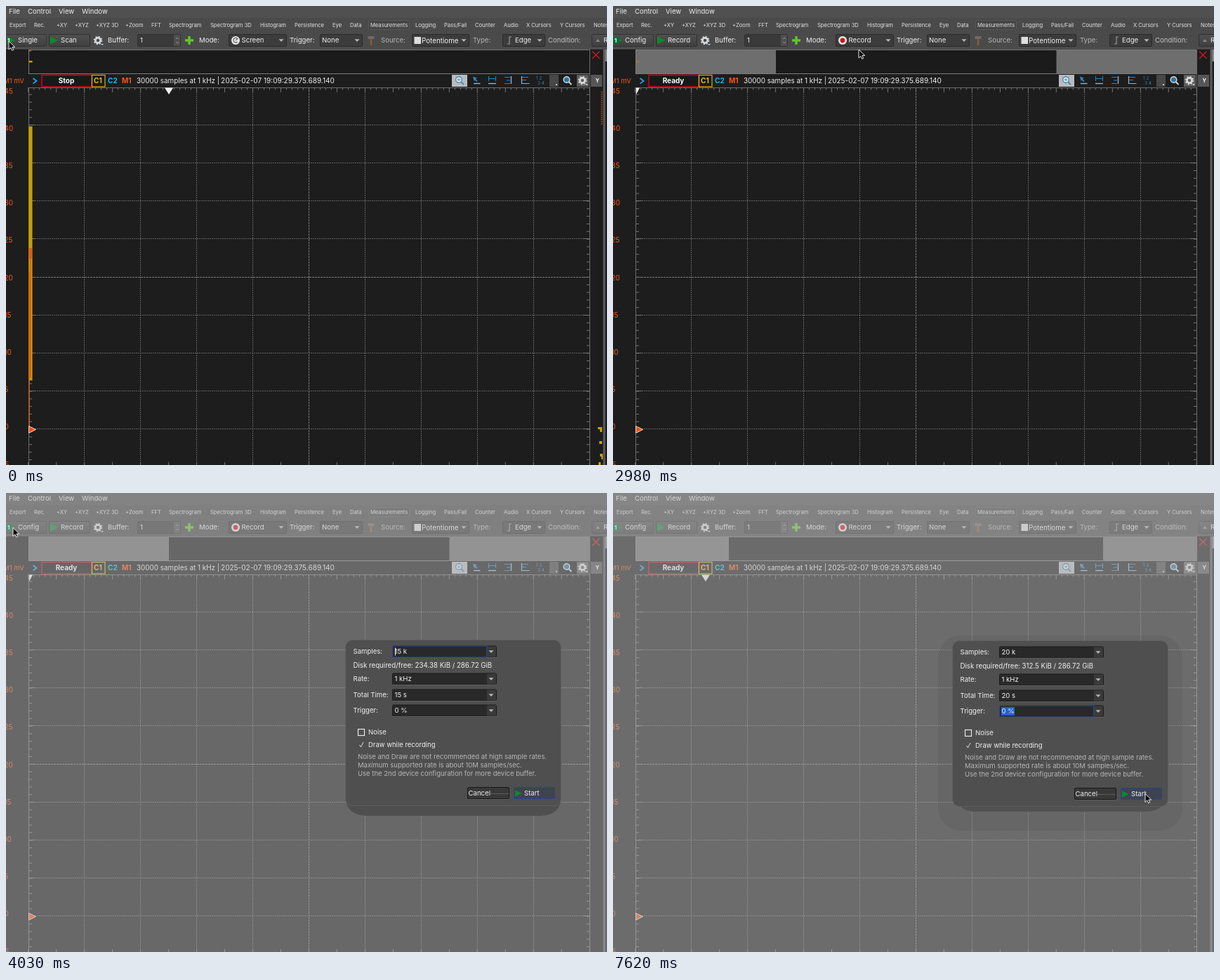
These frames come from a looping animation (856x654 px, 8 s). An HTML page:

```html
<!DOCTYPE html>
<html lang="en">
<head>
<meta charset="utf-8">
<title>Recorder setup</title>
<style>
html, body { margin: 0; width: 100%; height: 100%; overflow: hidden; background: #1d1d1d; }
svg { display: block; width: 856px; height: 654px; font-family: Inter, "Open Sans", sans-serif; }
text { white-space: pre; }
</style>
</head>
<body>
<svg id="stage" viewBox="0 0 856 654" xmlns="http://www.w3.org/2000/svg"></svg>
<script>
const LOOP = 8000;
const stage = document.getElementById('stage');
const el = id => document.getElementById(id);

// ---- drawing helpers: each returns markup ----
const rect = (x, y, w, h, fill, more = '') =>
  `<rect x="${x}" y="${y}" width="${w}" height="${h}" fill="${fill}" ${more}/>`;
const path = (d, fill, more = '') => `<path d="${d}" fill="${fill}" ${more}/>`;
const line = (d, color, more = '') => path(d, 'none', `stroke="${color}" ${more}`);
const text = (x, cy, s, size = 9.6, fill = '#f0f0f0', more = '') =>
  `<text x="${x}" y="${(cy + size * 0.36).toFixed(2)}" font-size="${size}" fill="${fill}" ${more}>${s}</text>`;
const bold = 'font-weight="700"';
const play = (x, cy, s = 5.5) => path(`M${x} ${cy - s}L${x + s * 2} ${cy}L${x} ${cy + s}Z`, '#0c8a2c');
const caret = (x, y) => path(`M${x - 3.5} ${y - 1.8}h7l-3.5 3.8z`, '#b4b4b4');
const box = (x, y, w, h, fill = 'url(#btn)', edge = '#303030', more = '') =>
  rect(x + 0.5, y + 0.5, w - 1, h - 1, fill, `stroke="${edge}" rx="1.5" ${more}`);
const combo = (x, w) => box(x, 40, w, 18, '#3c3c3c', '#2a2a2a') + caret(x + w - 8, 49);

function gear(x, y, color) {
  return `<circle cx="${x}" cy="${y}" r="3.6" fill="none" stroke="${color}" stroke-width="2.6"/>` +
    `<circle cx="${x}" cy="${y}" r="5.4" fill="none" stroke="${color}" stroke-width="1.8" stroke-dasharray="2.1 2.14"/>` +
    path(`M${x + 4} ${y + 5}h4l-2 2z`, color);
}

function lens(x, y, ring, fill) {
  return `<circle cx="${x}" cy="${y}" r="4.3" fill="${fill}" stroke="${ring}" stroke-width="1.4"/>` +
    line(`M${x + 3} ${y + 3}l4 4`, ring, 'stroke-width="1.8"');
}

function menus() {
  const top = [[4, 'File'], [31, 'Control'], [75, 'View'], [108, 'Window']];
  const tools = [[5, 'Export'], [40, 'Rec.'], [72, '+XY'], [98, '+XYZ'], [128, '+XYZ 3D'], [170, '+Zoom'],
    [207, 'FFT'], [232, 'Spectrogram'], [291, 'Spectrogram 3D'], [362, 'Histogram'], [411, 'Persistence'],
    [465, 'Eye'], [490, 'Data'], [519, 'Measurements'], [583, 'Logging'], [624, 'Pass/Fail'],
    [668, 'Counter'], [709, 'Audio'], [741, 'X Cursors'], [789, 'Y Cursors'], [837, 'Notes']];
  return rect(0, 0, 856, 61, '#4a4a4a') + rect(0, 0, 856, 17, '#505050') +
    rect(0, 60.5, 856, 1, '#626262') +
    box(516, 20, 59, 14, '#454545', '#585858') +
    top.map(([x, s]) => text(x, 8, s)).join('') +
    tools.map(([x, s]) => text(x, 27, s, 7.6, '#e4e4e4')).join('');
}

function controls() {
  return box(-3, 40, 61, 18, 'url(#btn)', '#343434', 'id="single"') +
    play(2, 49) + rect(0, 44, 9, 10, '#0b6b36', 'id="oneBack"') + text(2, 49, '1', 8, '#fff', bold) +
    text(17, 49, 'Single', 9.6, '#f0f0f0', 'id="singleText"') +
    box(61, 40, 59, 18) + `<g id="go">${play(63, 49)}</g>` +
    rect(63.5, 44, 11, 11, '#136797', 'id="halt" stroke="#0b4a75"') +
    text(78, 49, 'Scan', 9.6, '#f0f0f0', 'id="scanText"') +
    gear(131, 49, '#d6dade') + text(145, 49, 'Buffer:') +
    box(187, 40, 62, 18, '#3a3a3a') + text(191, 49, '1') + rect(239, 41, 9, 16, '#505050') +
    line('M242 47l2-2 2 2M242 51l2 2 2-2', '#8c8c8c') +
    line('M261 43v12M255 49h12', '#62c52a', 'stroke-width="3.4"') +
    text(275, 49, 'Mode:') + combo(317, 83) +
    '<circle cx="327" cy="49" r="6" fill="#ececec"/>' +
    `<g id="screenIcon">${line('M330 47a3.3 3.3 0 1 0-.4 4M327 49l3-2.4', '#555', 'stroke-width="1.2"')}</g>` +
    '<circle id="recIcon" cx="327" cy="49" r="3.4" fill="#d3131b"/>' +
    text(335.5, 49, 'Screen', 9.6, '#f0f0f0', 'id="modeText"') +
    text(404, 49, 'Trigger:') + combo(447, 61) + text(450, 49, 'None') +
    line('M520 46v10', '#8a5c2c', 'stroke-width="2.6"') + rect(515.5, 43, 9, 4, '#6b6b6b') +
    text(534, 49, 'Source:', 9.6, '#b4b4b4') + combo(578, 82) + rect(581.5, 44, 9.5, 10, '#dedede') +
    text(592, 49, 'Potentiome', 9.8) +
    text(665, 49, 'Type:', 9.6, '#b4b4b4') + combo(707, 61) +
    line('M714 54h3v-10h3', '#999', 'stroke-width="1.2"') + text(725, 49, 'Edge') +
    text(772, 49, 'Condition:', 9.6, '#c0c0c0') + box(834, 40, 30, 18) +
    path('M840 51l3-4 3 4z', '#888') + text(851, 49, 'R');
}

function overview() {
  return rect(32.5, 62.5, 799, 34, '#6e6e6e', 'stroke="#7c7c7c"') +
    rect(33, 63, 798, 33, '#1b1b1b', 'id="win"') +
    rect(33, 78, 4.5, 2.5, '#c79f00', 'id="ovMark"') + rect(33, 62.5, 3, 2, '#c45a20', 'class="data"') +
    line('M835 64.5l10.5 10.5M845.5 64.5l-10.5 10.5', '#d01822', 'stroke-width="1.4"');
}

function status() {
  const blue = '#2583cc', pale = '#8fb4d0';
  return line('M38.5 103l5 3.8-5 3.8', '#2a9cf0', 'stroke-width="1.8"') +
    rect(51, 98.5, 71, 16.5, '#191919', 'id="stateBox" stroke-width="1.6"') +
    text(86, 106.7, 'Stop', 10, '#fff', `id="stateText" text-anchor="middle" ${bold}`) +
    rect(122.5, 98.5, 18.5, 16.5, '#191919', 'stroke="#d9b01c" stroke-width="1.2"') +
    text(125, 106.7, 'C1', 10, '#e8bc1c', bold) + text(145, 106.7, 'C2', 10, '#1cb5ee', bold) +
    text(165, 106.7, 'M1', 10, '#f35a17', bold) +
    text(186, 106.7, '30000 samples at 1 kHz', 9.9) + text(301, 106.7, '|', 9.9) +
    text(306, 106.7, '2025-02-07 19:09:29.375.689.140', 10.05) +
    rect(635, 98, 22, 17, '#b8bcbf') + lens(645, 105, '#4a86ad', '#e4ecf1') + line('M643 105h4M645 103v4', '#3585b8') +
    path('M665 100.5l6 2-2 1.4 2.6 2.6-1.5 1.5-2.6-2.6-1 1.6z', blue) + line('M666 110.5h9.5', pale, 'stroke-width="1.4"') +
    line('M687.5 100v7M697.5 100v7M688 103.5h9', blue) + line('M687 110.5h11', pale, 'stroke-width="1.4"') +
    line('M710 101.5h8M710 110.5h8M713 106h5', blue) + line('M719.5 100v11', pale, 'stroke-width="1.4"') +
    line('M735 101.5h9M735 105.5h6', blue) + line('M734.5 100v10.5h11', pale, 'stroke-width="1.2"') +
    text(755, 103, '1 2', 6.5, blue) + text(757, 110, '3 4', 6.5, blue) +
    rect(774, 98, 13, 17, '#484848') + rect(783, 111, 2, 2, '#bbb') +
    lens(798.5, 105, '#d8dde0', '#2d76a4') +
    rect(813, 98, 17, 17, '#5e5e5e') + gear(821, 106, '#dadada') +
    rect(833, 98, 16, 17, '#565656') + text(839.5, 106.7, 'Y', 7.5, '#fff', bold);
}

function grid() {
  let s = '', ticks = '';
  const rule = (d, mid) => line(d, mid ? '#787878' : '#606060', `stroke-dasharray="${mid ? '3 1' : '2 1'}"`);
  for (let i = 1; i < 10; i++) s += rule(`M${Math.floor(31.7 + i * 79.95) + 0.5} 116V654`, i === 5);
  for (let i = 0; i < 9; i++) {
    const y = Math.floor(169.2 + i * 54.2) + 0.5;
    s += rule(`M32 ${y}H831`, i === 4);
    ticks += `M32 ${y}h9M831 ${y}h-9`;
  }
  for (let i = 0; i <= 100; i++) {
    const x = (31.7 + i * 7.995).toFixed(1);
    ticks += `M${x} 116v${i % 5 ? 3.5 : 7}`;
    if (i % 5 === 0) ticks += `M${x} 654v-4`;
  }
  for (let y = 126.2; y < 654; y += 10.84) ticks += `M32 ${y.toFixed(1)}h5M831 ${y.toFixed(1)}h-4`;
  s += line(ticks, '#747474') + line('M32.5 116V654M831.5 62V654M32 116.5H831', '#6c6c6c');
  for (let i = 0; i <= 10; i++) s += text(i === 10 ? -6 : -2.5, 121 + i * 53.2, 45 - i * 5, 10, '#f35a17');
  return s + text(-4, 106.7, 'M1 mV', 9.6, '#f35a17');
}

function signal() {
  return '<g class="data">' + rect(32.5, 171.5, 5, 362, '#c9a000') +
    rect(33, 345, 4, 15, '#e9570c') + rect(33.8, 360, 1.8, 170, '#e9570c') + rect(32.8, 380, 1, 222, '#e9570c') +
    line('M848.5 122V170', '#b5501c', 'stroke-width="2" stroke-dasharray="1.5 1.5"') +
    path('M843 600h6v7h-3v-4h-3zM845 620h4v4h-4zM846 638h4v8h-2v-4h-2zM844 650h3v4h-3z', '#c9a000') + '</g>' +
    path('M32.5 598.5L42.5 603.5L32.5 608.5Z', '#f2510e', 'stroke="#eee" stroke-width=".9"');
}

function field(cy, name, label, value) {
  return text(494.5, cy, label) + box(550, cy - 8.5, 149, 17, '#292929', '#1b1b1b') +
    line(`M551 ${cy + 8.5}H699`, '#707070', 'stroke-width=".7"') +
    rect(685, cy - 7.5, 13, 15, '#3a3a3a') + caret(691, cy) +
    rect(550.7, cy - 8, 134, 16, 'none', `id="${name}Focus" stroke="#2a4a8c" stroke-width="1.2"`) +
    rect(553, cy - 6, 19, 12, '#2c60cc', `id="${name}Sel"`) +
    text(553.5, cy, value, 9.6, '#f4f4f4', `id="${name}"`);
}

function dialog() {
  const hints = ['Noise and Draw are not recommended at high sample rates.',
    'Maximum supported rate is about 10M samples/sec.',
    'Use the 2nd device configuration for more device buffer.'];
  return `<g id="dialog">
    ${rect(463, 203, 348, 278, '#000', 'id="halo" rx="32" opacity=".06"')}
    ${path('M495 446q5 8 24 8H756q20 0 25-8z', '#525252', 'id="lip"')}
    ${path('M484 440q4 21 32 21H759q28 0 31-21z', '#4f4f4f', 'id="drop"')}
    ${rect(483.5, 210.5, 307, 236, '#4f4f4f', 'rx="10" stroke="#626262" stroke-width=".8"')}` +
    field(227, 'samples', 'Samples:', '15 k') +
    text(494.5, 247, '', 9.7, '#f0f0f0', 'id="disk"') +
    field(266, 'rate', 'Rate:', '1 kHz') + field(289, 'total', 'Total Time:', '15 s') +
    field(311, 'trigger', 'Trigger:', '0 %') +
    line('M554.5 221.5v11', '#fff', 'id="ibeam"') +
    rect(501.5, 337.5, 9, 9, 'none', 'stroke="#e8e8e8" stroke-width="1.2"') + text(516, 342, 'Noise') +
    line('M503.5 360l2 3 3.5-7', '#ddd') + text(516, 360, 'Draw while recording', 9.5) +
    hints.map((s, i) => text(501, 377 + i * 12, s, 9.5, '#b6b6b6')).join('') +
    box(657, 420, 60, 17, '#393939', '#181818') + line('M690 429.5h26M658 437.5h59', '#5c5c5c') + text(658.5, 429, 'Cancel') +
    box(723, 420, 59, 17, '#3d4350', '#2b4583') + play(725, 429, 4.8) + text(738, 429, 'Start') + '</g>';
}

stage.innerHTML =
  `<defs><linearGradient id="btn" x1="0" y1="0" x2="0" y2="1">
    <stop offset="0" stop-color="#505050"/><stop offset="1" stop-color="#3f3f3f"/></linearGradient>
   <linearGradient id="lit" x1="0" y1="0" x2="0" y2="1">
    <stop offset="0" stop-color="#454e66"/><stop offset="1" stop-color="#343c55"/></linearGradient></defs>` +
  rect(0, 0, 856, 654, '#1d1d1d') + menus() + controls() + overview() + grid() + status() +
  rect(850.5, 62, 3, 592, '#5c5c5c') + rect(853.5, 62, 2.5, 17, '#8a8a8a') +
  signal() + path('', '#f2f2f2', 'id="mark"') +
  rect(0, 0, 856, 654, '#bbb', 'id="veil"') + dialog() +
  path('M0 0V12L2.8 9.4L4.7 13.4L6.7 12.5L4.9 8.6H8.8Z', '#080808', 'id="pointer" stroke="#fff" stroke-width=".9"');

// ---- timeline: [start ms, value...] rows, each held until the next ----
const at = (rows, t) => rows.filter(r => r[0] <= t).pop();
const POINTER = [[0, 4, 50], [1040, 6, 50], [1190, 9, 50],
  [1640, 30, 38], [1790, 150, 6], [1940, 310, 18], [2090, 406, 63], [2230, 382.5, 50], [2380, 379, 50],
  [2830, 352, 62], [2980, 350, 62], [3130, 255, 20], [3280, 130, 8], [3430, 42, 40], [3580, 11, 50],
  [3730, 10, 49.5], [4630, 573, 283], [4780, 572, 283], [4930, 562, 284], [5080, 540, 284],
  [5230, 514, 283], [5380, 498.5, 283],
  [7180, 540, 305], [7330, 655, 372], [7480, 740, 422], [7620, 758, 428.5]];
// veil opacity, dialog opacity, dialog offset
const FADE = [[0, 0, 0, -19], [3880, .17, .48, -19], [4030, .475, 1, -1], [4180, .49, 1, 0], [4330, .5, 1, 0]];
const STATE = [[0, 'Stop', '#c4051c'], [300, 'Config', '#d8ac12'], [2980, 'Ready', '#c4051c']];

const show = (id, on) => el(id).setAttribute('visibility', on ? 'inherit' : 'hidden');
const say = (id, s) => { if (el(id).textContent !== s) el(id).textContent = s; };
const set = (id, name, v) => el(id).setAttribute(name, v);

function draw(t) {
  const rec = t >= 2980, running = t >= 300 && !rec, done = t >= 6880;
  const lit = (t >= 150 && !rec) || (t >= 3730 && t < 3880);

  const [, state, color] = at(STATE, t);
  say('stateText', state);
  set('stateBox', 'stroke', color);
  say('singleText', rec ? 'Config' : 'Single');
  say('scanText', rec ? 'Record' : running ? 'Stop' : 'Scan');
  say('modeText', rec ? 'Record' : 'Screen');
  show('go', !running);
  show('halt', running);
  show('screenIcon', !rec);
  show('recIcon', rec);
  show('oneBack', t >= 150);
  set('single', 'fill', lit ? 'url(#lit)' : 'url(#btn)');
  set('single', 'stroke', lit ? '#2d4788' : '#343434');

  document.querySelectorAll('.data').forEach(n => n.setAttribute('visibility', rec ? 'hidden' : 'inherit'));
  set('ovMark', 'opacity', rec ? (t < 4030 ? .4 : 0) : 1);
  const [x0, x1] = done ? [165, 698] : rec ? [232, 631.5] : [33, 831];
  set('win', 'x', x0);
  set('win', 'width', x1 - x0);
  const m = done ? 132 : 232;
  set('mark', 'd', rec && !done ? 'M33 116.5H38L33 126Z' : `M${m - 6} 116.5h12l-6 9.5z`);

  const [, veil, alpha, dy] = at(FADE, t);
  set('veil', 'opacity', veil);
  set('dialog', 'opacity', alpha);
  set('dialog', 'transform', `translate(0 ${dy})`);
  show('halo', t >= 4180);
  show('lip', t >= 4180);
  show('drop', t >= 4030 && t < 4180);

  const focus = done ? 'trigger' : t >= 4630 ? 'total' : 'samples';
  for (const f of ['samples', 'rate', 'total', 'trigger']) {
    show(f + 'Focus', f === focus);
    show(f + 'Sel', f === 'trigger' ? done : f === 'total' && t >= 4780 && t < 6430);
  }
  show('ibeam', focus === 'samples');
  say('samples', done ? '20 k' : '15 k');
  say('total', done ? '20 s' : t >= 6580 ? '20' : t >= 6430 ? '2' : '15 s');
  say('disk', `Disk required/free: ${done ? '312.5' : '234.38'} KiB / 286.72 GiB`);

  const [, px, py] = at(POINTER, t);
  const left = Math.min(571, Math.max(553, px));
  set('totalSel', 'x', left);
  set('totalSel', 'width', 572 - left);
  show('pointer', t < 4180 || t >= 4630);
  set('pointer', 'transform', `translate(${px} ${py})`);
}

const begin = performance.now();
function tick() {
  draw((performance.now() - begin) % LOOP);
  requestAnimationFrame(tick);
}
tick();
</script>
</body>
</html>
```
